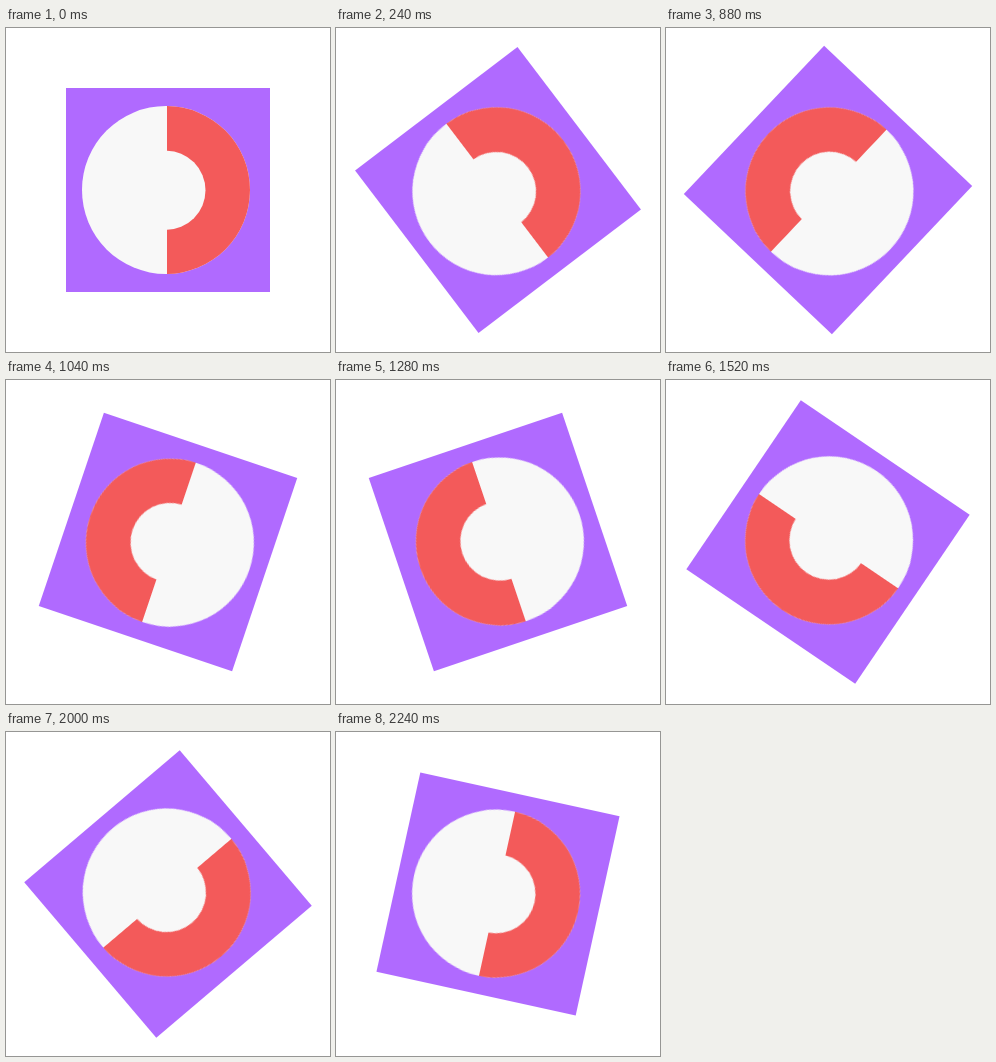
An HTML page that plays this animation: 324 px wide and 324 px high, repeating every 2320 ms.

```html
<!DOCTYPE html>
<html lang="en">
<head>
<meta charset="utf-8">
<title>Spinning disc</title>
<style>
  html, body {
    margin: 0;
    width: 100%;
    height: 100%;
    overflow: hidden;
    background: #fff;
  }
  svg {
    display: block;
    width: 100vw;
    height: 100vh;
  }
  .spinner {
    transform-origin: 162px 162px;
    animation: spin 2320ms steps(29) infinite;
  }
  @keyframes spin {
    from { transform: rotate(0deg); }
    to { transform: rotate(-360deg); }
  }
  .tile { fill: #b06aff; }
  .disc { fill: #f8f8f8; }
  .ring { fill: #f35a5a; }
</style>
</head>
<body>
<svg viewBox="0 0 324 324">
  <clipPath id="right-half">
    <rect x="161" y="60" width="103" height="204"/>
  </clipPath>
  <g class="spinner">
    <rect class="tile" x="60" y="60" width="204" height="204"/>
    <!-- The disc sits slightly off the pivot, so it wobbles as it turns. -->
    <circle class="disc" cx="160" cy="162" r="84"/>
    <g clip-path="url(#right-half)">
      <circle class="ring" cx="160" cy="162" r="84"/>
      <circle class="disc" cx="160" cy="162.3" r="39.5"/>
    </g>
  </g>
</svg>
</body>
</html>
```
